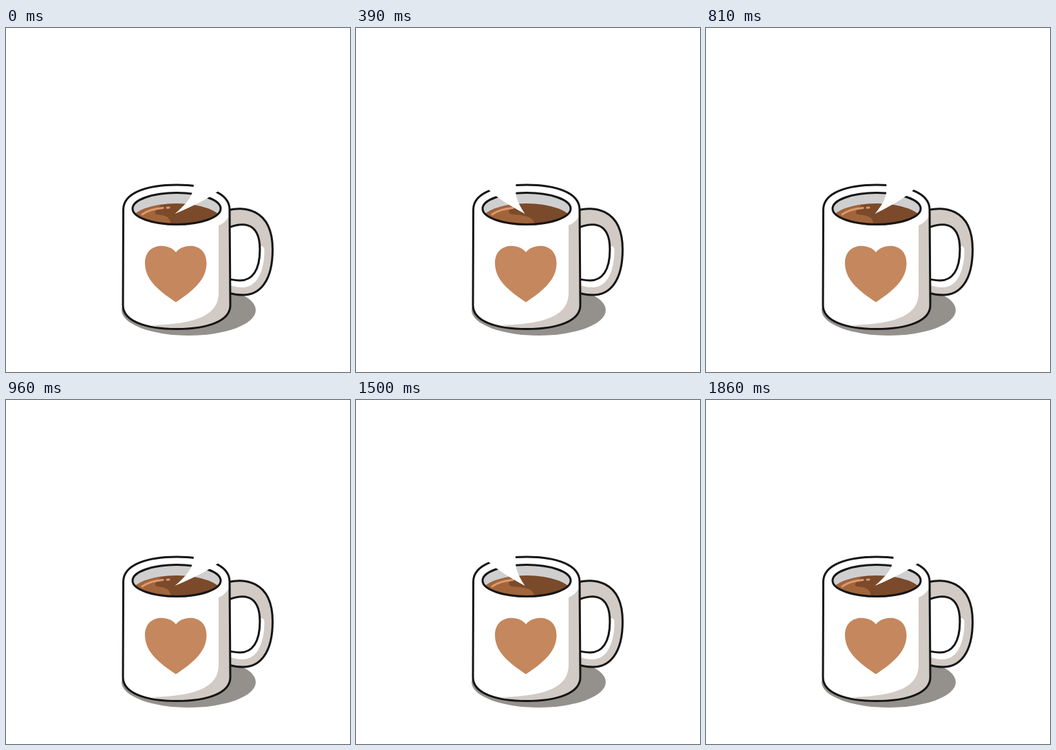
These frames come from a looping animation (500x500 px, 1890 ms). An HTML page:

```html
<!DOCTYPE html>
<html lang="en">
<head>
<meta charset="utf-8">
<title>Hot coffee</title>
<style>
html, body { margin: 0; width: 100%; height: 100%; overflow: hidden; background: #fff; }
svg { display: block; width: 100vw; height: 100vh; }
.line { fill: none; stroke: #151515; stroke-width: 3; stroke-linecap: round; stroke-linejoin: round; }
.shade { fill: #d2cac4; }
.white { fill: #fff; }
.shine { fill: none; stroke: #dc9a6e; stroke-width: 3; stroke-linecap: round; }
</style>
</head>
<body>
<svg viewBox="0 0 500 500">
  <defs>
    <path id="body" d="M170.500 264C170.500 239 206 228 248 228S325 239 325 264L326 403C326 426 293 437.500 248 437.500S170 426 170 403Z"/>
    <path id="handle" d="M324 264.500C341 260 387.500 259 387.500 322C387.500 369 368 388 345 388C336 388 330 387 324 385V365C330 366 334 367 340 367C358 367 369 352 369 322C369 276 337 285 324 290Z"/>
    <ellipse id="mouth" cx="248" cy="262.500" rx="64" ry="23"/>
    <clipPath id="inBody"><use href="#body"/></clipPath>
    <clipPath id="inHandle"><use href="#handle"/></clipPath>
    <clipPath id="inMouth"><use href="#mouth"/></clipPath>
    <clipPath id="inCoffee"><ellipse cx="248" cy="281" rx="66" ry="26"/></clipPath>
  </defs>

  <ellipse cx="265.500" cy="410" rx="97.500" ry="37" fill="#94918d"/>

  <use href="#handle" class="shade"/>
  <path class="white" clip-path="url(#inHandle)" d="M366 318Q375 315 375.500 322C376 352 365 378 343 377Q334 377 324 373V362H345Z"/>
  <use href="#handle" class="line"/>

  <use href="#body" class="white"/>
  <path class="shade" clip-path="url(#inBody)" d="M328 266C322 280 316 284 309 287V385C309 416 280 430 212 432L250 442H328Z"/>
  <use href="#body" class="line"/>

  <g clip-path="url(#inMouth)">
    <use href="#mouth" fill="#d0cfd0"/>
    <g clip-path="url(#inCoffee)">
      <rect x="180" y="250" width="136" height="40" fill="#7b4a2a"/>
      <path id="swirl" fill="#a2653b"/>
    </g>
    <path class="shine" d="M198 271Q209 263 228 261.500M234 261.200L237 261"/>
  </g>
  <use href="#mouth" class="line"/>

  <path fill="#c5875d" d="M247 326C237 312 202 311 202 342C202 368 227 385 247 398.500C267 385 291.500 368 291.500 342C291.500 311 257 312 247 326Z"/>
  <path id="steam" class="white"/>
</svg>
<script>
const LOOP = 1890, SWAY = LOOP / 2, STEPS = 40;
const steam = document.getElementById("steam");
const swirl = document.getElementById("swirl");

// A wave climbs the steam: u runs from the tip (0) to the top (1)
function steamPath(phase) {
  const left = [], right = [];
  for (let i = 0; i <= STEPS; i++) {
    const u = i / STEPS;
    const lean = Math.sin(1.4 * Math.cos(phase - 4 * u ** 3));
    const x = 245.5 + (7 + 55 * lean) * Math.tanh(6 * u);
    const y = 270 - 215 * u;
    const half = 40 * Math.sin(Math.PI * u);
    left.push([x - half, y]);
    right.unshift([x + half, y]);
  }
  return `M${left.concat(right).join("L")}Z`;
}

// The light part of the coffee slides right by s and back
function swirlPath(phase) {
  const s = 11 * (1 - Math.cos(phase));
  return `M180 250H232C${222 + s * .2} 262 ${212 + s * .2} 268 ${219 + s * .4} 271` +
    `C${232 + s * .7} 272 ${240 + s} 274 ${240 + s} 290H180Z`;
}

const start = performance.now();
function tick() {
  const phase = 2 * Math.PI * ((performance.now() - start) % LOOP) / SWAY;
  steam.setAttribute("d", steamPath(phase));
  swirl.setAttribute("d", swirlPath(phase));
  requestAnimationFrame(tick);
}
tick();
</script>
</body>
</html>
```
